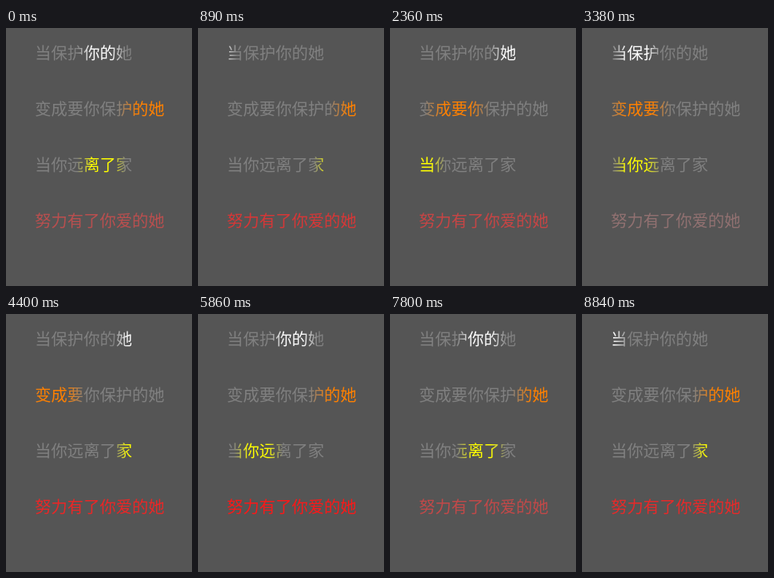
Write an HTML page that moves like this. It is 233 px wide and 323 px high and loops after 8940 ms.

```html
<!DOCTYPE html>
<html lang="zh-CN">
<head>
<meta charset="utf-8">
<style>
  html, body { margin: 0; width: 100%; height: 100%; overflow: hidden; background: #555; }
  p {
    position: absolute; left: 36.3px; margin: 0;
    font: 300 20.3px/30px "Noto Sans CJK SC", "Noto Sans CJK", sans-serif;
    white-space: nowrap;
  }
  .shine {
    color: transparent;
    background: linear-gradient(90deg, #808080, var(--glow) 30% 70%, #808080) no-repeat #808080;
    background-size: 50% 100%;
    -webkit-background-clip: text; background-clip: text;
  }
</style>
</head>
<body>
<p class="shine" style="top:15px; --glow:#fff">当保护你的她</p>
<p class="shine" style="top:85px; --glow:#ff8000">变成要你保护的她</p>
<p class="shine" style="top:155px; --glow:#ff0">当你远离了家</p>
<p style="top:225px">努力有了你爱的她</p>
<script>
const LOOP = 8940, STEP = 146.8, LAST = 60;
const [white, orange, yellow, red] = document.querySelectorAll('p');

const cycle = (s, period) => s / period % 1;
const pingPong = (s, period) => 1 - Math.abs(1 - s / period % 2);

// Slides the half-width band from just off the left (0) to just off the right (1).
function shine(line, progress) {
  const width = line.offsetWidth;
  line.style.backgroundPosition = (1.5 * progress - 0.5) * width + 'px 0';
}

function draw(now) {
  const step = Math.min(LAST, Math.floor((now % LOOP + 20) / STEP));
  const s = 1.24 + 0.15 * step;
  shine(white, cycle(s, 2));
  shine(orange, 1 - cycle(s, 1));
  shine(yellow, pingPong(s, 2));
  const heat = pingPong(s, 0.8), cool = 128 - 108 * heat;
  red.style.color = `rgb(${128 + 127 * heat}, ${cool}, ${cool})`;
  requestAnimationFrame(draw);
}
draw(performance.now());
</script>
</body>
</html>
```
